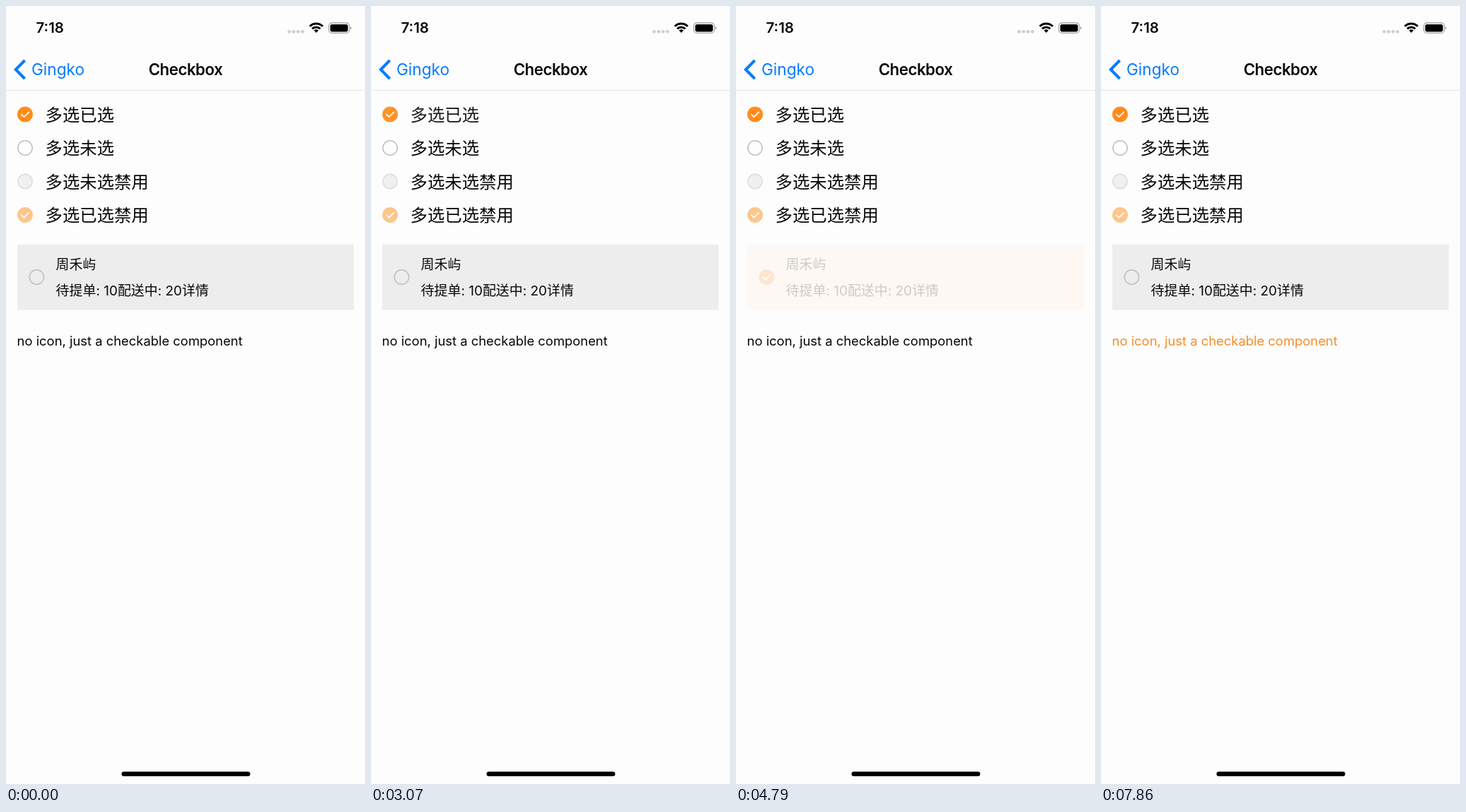
These frames come from a looping animation (508x1102 px, 7.94 s). An HTML page:

```html
<!DOCTYPE html>
<html lang="zh-CN">
<head>
<meta charset="utf-8">
<title>Checkbox</title>
<style>
html, body { margin: 0; width: 100%; height: 100%; overflow: hidden; background: #fdfdfd; }
svg { display: block; width: 100%; height: 100%; }
text { font-family: Inter, "Noto Sans CJK SC", "Noto Sans CJK JP", "Noto Sans CJK", sans-serif; fill: #080808; }
.label { font-size: 24.4px; }
.small { font-size: 18.97px; }
.note { font-size: 18.4px; }
.bold { font-weight: 600; }
.ring { fill: none; stroke: #bfbfbf; stroke-width: 1.5; }
.disc { fill: #ff8c1a; }
.tick { fill: none; stroke: #fff; stroke-width: 1.7; stroke-linecap: round; stroke-linejoin: round; }
.disabled .disc { fill: #fcc68c; }
.disabled .ring { fill: #f0f0f1; stroke: #dcdcdc; }
.panel { fill: #ededee; }
.on > .panel { fill: #fee5d0; }
.box .disc, .box .tick, .on > .box .ring { display: none; }
.on > .box .disc, .on > .box .tick { display: inline; }
#note.on text { fill: #f5851a; }
</style>
</head>
<body>
<svg viewBox="0 0 508 1102" preserveAspectRatio="none">
  <defs>
    <g id="ring"><circle class="ring" r="10.2"/></g>
  </defs>
  <rect width="508" height="1102" fill="#fdfdfd"/>

  <text class="bold" x="42.5" y="38.3" font-size="20.5">7:18</text>
  <g fill="#cecece">
    <circle cx="400.7" cy="36.3" r="2.4"/><circle cx="407" cy="36.3" r="2.4"/>
    <circle cx="413.3" cy="36.3" r="2.4"/><circle cx="419.6" cy="36.3" r="2.4"/>
  </g>
  <g fill="none" stroke="#000" stroke-width="3">
    <path d="M429.8 28.8A13 13 0 0 1 448.2 28.8M433.3 32.3A8 8 0 0 1 444.7 32.3"/>
    <path d="M439 38L435.8 34.6A4.5 4.5 0 0 1 442.2 34.6Z" fill="#000" stroke="none"/>
  </g>
  <rect x="456.8" y="24" width="29" height="14.4" rx="4.4" fill="none" stroke="#a6a6a6" stroke-width="1.3"/>
  <rect x="458.8" y="26" width="25" height="10.4" rx="2.6"/>
  <path d="M487.2 28.8a2.6 2.6 0 0 1 0 4.8z" fill="#a6a6a6"/>

  <path d="M26.6 77L13.8 90L26.6 103" fill="none" stroke="#087bfb" stroke-width="4"/>
  <text x="36" y="98.3" font-size="22.6" style="fill:#087bfb">Gingko</text>
  <text class="bold" x="254" y="98" font-size="22.3" letter-spacing="-.5" text-anchor="middle">Checkbox</text>
  <path d="M0 119.5H508" stroke="#e4e4e4"/>

  <g id="rows"></g>

  <g id="card">
    <rect class="panel" x="16" y="338" width="476" height="92.5"/>
    <g class="box" transform="translate(43.4 384)"></g>
    <text class="small" x="70.6" y="373.2">周禾屿</text>
    <text class="small" x="70.6" y="409.6">待提单: 10配送中: 20详情</text>
  </g>
  <g id="note"><text class="note" x="15.6" y="481.2">no icon, just a checkable component</text></g>

  <rect x="163.5" y="1084.5" width="182" height="6.6" rx="3.3"/>
</svg>
<script>
const LOOP = 7940;
const $ = id => document.getElementById(id);

const rows = [
  ['first', '多选已选', 'on'],
  ['second', '多选未选', ''],
  ['third', '多选未选禁用', 'disabled'],
  ['fourth', '多选已选禁用', 'on disabled']
];
$('rows').innerHTML = rows.map(([id, label, state], i) => {
  const y = 153.5 + 47.5 * i;
  return `<g id="${id}" class="${state}"><g class="box" transform="translate(27 ${y})"></g>
    <text class="label" x="55.5" y="${y + 9.3}">${label}</text></g>`;
}).join('');
for (const box of document.querySelectorAll('.box')) {
  box.innerHTML = `<circle class="ring" r="10.2"/><circle class="disc" r="11"/>
    <path class="tick" d="M-5.2 .1L-1.5 3.6L5.3 -3.2"/>`;
}

// A press dims at once; the release sets the state and fades back in steps.
const FADE = [[0, .2], [75, .22], [147, .4], [222, .72], [297, .93]];
const tap = (id, down, up, on, settle) =>
  ({ id, on, up, steps: [[down, .2], ...FADE.map(([t, o]) => [up + t, o]), [settle, 1]] });

const taps = [
  tap('second', 1200, 1350, true, 1690),
  { id: 'second', on: false, up: 1870, steps: [[1720, .2], [1950, .4], [2020, .75], [2170, 1]] },
  tap('first', 2690, 2770, true, 3890),
  tap('card', 3890, 4040, true, 4400),
  tap('card', 4790, 4940, false, 7410),
  tap('note', 7410, 7560, true, LOOP)
];
const parts = { first: true, second: false, card: false, note: false };

function draw(time) {
  for (const id in parts) {
    let on = parts[id], opacity = 1;
    for (const press of taps) {
      if (press.id !== id) continue;
      if (time >= press.up) on = press.on;
      for (const [at, value] of press.steps) if (time >= at) opacity = value;
    }
    $(id).classList.toggle('on', on);
    $(id).setAttribute('opacity', opacity);
  }
}

const start = performance.now();
function tick() {
  draw((performance.now() - start) % LOOP);
  requestAnimationFrame(tick);
}
tick();
</script>
</body>
</html>
```
